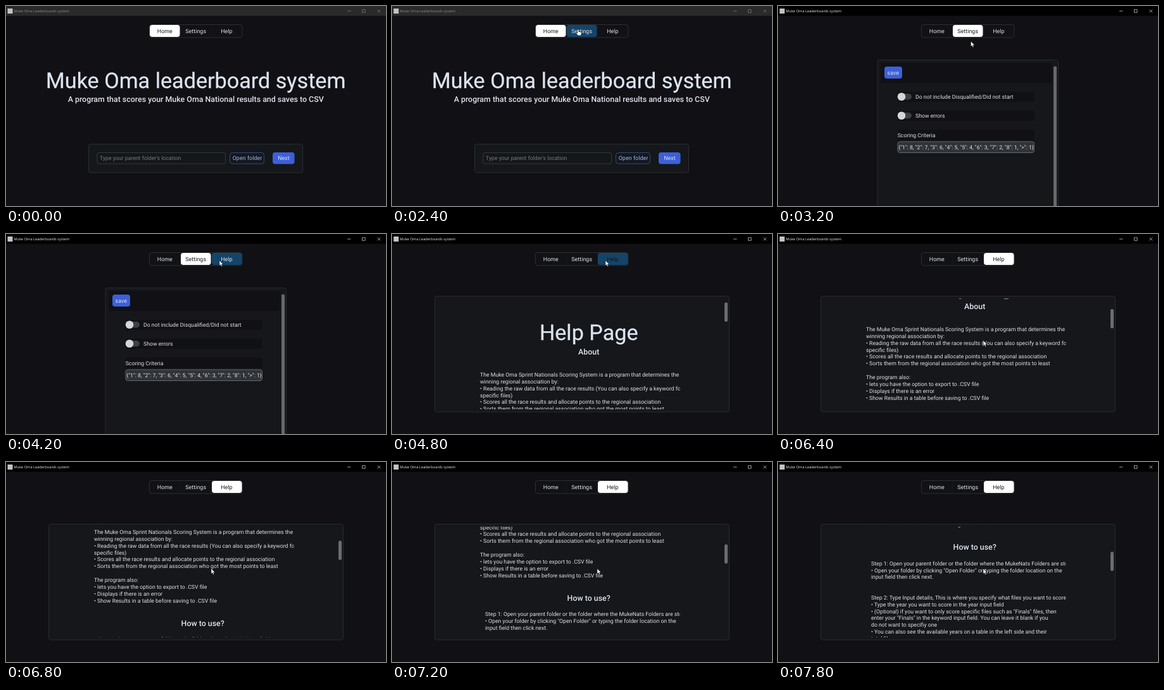
An HTML page for the animation above (8 s loop, 600 px wide and 317 px high).

```html
<!DOCTYPE html>
<html lang="en">
<head>
<meta charset="utf-8">
<title>Leaderboard system</title>
<style>
html, body { margin: 0; width: 100%; height: 100%; overflow: hidden; background: #111014; }
svg { display: block; width: 100vw; height: 100vh; }
text { font: 8.72px Roboto, sans-serif; fill: #dfe1e6; white-space: pre; text-rendering: geometricPrecision; }
.mid { text-anchor: middle; }
.label { font-size: 8.9px; letter-spacing: .06px; text-anchor: middle; }
.big { font-size: 34.15px; fill: #dce4f0; stroke: #dce4f0; stroke-width: .3; text-anchor: middle; }
.sub { font-size: 12.4px; font-weight: 500; fill: #dfe4ee; text-anchor: middle; }
.bar text { font: 5.7px "Open Sans", sans-serif; }
.panel { fill: #15171b; stroke: #262b31; }
</style>
</head>
<body>
<svg viewBox="0 0 600 317">
  <defs>
    <clipPath id="view"><rect x="130" y="102.5" width="324.5" height="175.5"/></clipPath>
  </defs>
  <rect width="600" height="317" fill="#111014"/>

  <g class="bar">
    <rect id="bar" width="600" height="15.5"/>
    <rect x="2.5" y="4" width="8" height="8" fill="#c4c4c4"/>
    <text id="caption" x="12.5" y="10.3">Muke Oma Leaderboards system</text>
    <path id="controls" d="M539 8h5.5M562.5 5.7h4.6v4.6h-4.6zM586.5 5.7l4.6 4.6M591.1 5.7l-4.6 4.6" fill="none" stroke-width=".7"/>
  </g>

  <rect x="226.5" y="29.5" width="146.5" height="20.5" rx="3.5" fill="#111215" stroke="#2b2f33"/>
  <path d="M275.5 30v20M324.5 30v20" stroke="#17191d"/>
  <g id="tabs"></g>

  <g id="home">
    <text class="big" x="299.7" y="130">Muke Oma leaderboard system</text>
    <text class="sub" x="299.7" y="152">A program that scores your Muke Oma National results and saves to CSV</text>
    <rect class="panel" x="130.5" y="219" width="338" height="45" rx="3" style="stroke:#283031"/>
    <rect x="144" y="232.5" width="202.5" height="17.5" rx="2.5" fill="#14171a" stroke="#34393d"/>
    <text x="148" y="244" style="fill:#777b80">Type your parent folder's location</text>
    <rect x="353.5" y="232.5" width="54" height="17.5" rx="4" fill="#14181f" stroke="#30497f"/>
    <text class="label" x="381" y="244" style="fill:#a6b6ee">Open folder</text>
    <rect x="421" y="232" width="34.5" height="18.5" rx="4" fill="#3c60da"/>
    <text class="label" x="438.5" y="244">Next</text>
  </g>

  <g id="settings">
    <rect class="panel" x="157" y="85.5" width="285.5" height="250" rx="3"/>
    <rect x="162" y="90" width="270.5" height="32" rx="3" fill="#111115"/>
    <rect x="435" y="95.5" width="5" height="240" rx="2" fill="#66686a"/>
    <rect x="168" y="96" width="28" height="19" rx="4" fill="#3c60da"/>
    <text class="label" x="181.8" y="108.5">save</text>
    <g id="toggle">
      <rect x="189" y="136" width="216" height="16" rx="2" fill="#111115"/>
      <rect x="189" y="139" width="22" height="9.5" rx="4.7" fill="#3d4047"/>
      <circle cx="195" cy="143.8" r="6.3" fill="#d6d6da"/>
    </g>
    <use href="#toggle" y="30"/>
    <text x="217" y="147">Do not include Disqualified/Did not start</text>
    <text x="217" y="177">Show errors</text>
    <rect x="189" y="196" width="216" height="17" rx="2" fill="#111115"/>
    <text x="188.7" y="208.3">Scoring Criteria</text>
    <rect x="189" y="215" width="215.5" height="17.5" rx="3.5" fill="#303337" stroke="#63676c"/>
    <text class="mid" x="297" y="226.8">{"1": 8, "2": 7, "3": 6, "4": 5, "5": 4, "6": 3, "7": 2, "8": 1, "&gt;": 1}</text>
  </g>

  <g id="help">
    <rect class="panel" x="67.5" y="98.5" width="465" height="183.5" rx="3"/>
    <g clip-path="url(#view)">
      <g id="page">
        <text class="big" x="310.7" y="168.3">Help Page</text>
        <text class="sub" x="310.7" y="190.5">About</text>
        <text class="sub" x="310.7" y="371.8">How to use?</text>
      </g>
    </g>
    <rect id="thumb" x="525" width="5" height="30.5" rx="2" fill="#6c6d6f"/>
  </g>

  <path id="arrow" d="M0 0v8.2l1.9-1.7 1.3 2.9 1.4-.6-1.3-2.9h2.6z" fill="#fff" stroke="#111" stroke-width=".5"/>
  <path id="hand" d="M-1 .4q.9-1 1.8 0v3.2l3.5 .8q.9 .3 .8 1.3l-.7 4h-4.8l-2.8-3.7q.5-1.1 2.2 .1z" fill="#fff" stroke="#111" stroke-width=".5"/>
</svg>
<script>
const $ = id => document.getElementById(id);

function add(parent, tag, attrs, text = "") {
  const el = document.createElementNS("http://www.w3.org/2000/svg", tag);
  for (const k in attrs) el.setAttribute(k, attrs[k]);
  el.textContent = text;
  return parent.appendChild(el);
}

function paragraph(x, y, text) {
  text.split("\n").forEach((line, i) => add($("page"), "text", { x, y: y + i * 10.85 }, line));
}

paragraph(139, 226, `The Muke Oma Sprint Nationals Scoring System is a program that determines the
winning regional association by:
• Reading the raw data from all the race results (You can also specify a keyword for
specific files)
• Scores all the race results and allocate points to the regional association
• Sorts them from the regional association who got the most points to least

The program also:
• lets you have the option to export to .CSV file
• Displays if there is an error
• Show Results in a table before saving to .CSV file`);

paragraph(147, 396, `Step 1: Open your parent folder or the folder where the MukeNats Folders are stored
• Open your folder by clicking "Open Folder" or typing the folder location on the
input field then click next.


Step 2: Type Input details, This is where you specify what files you want to score
• Type the year you want to score in the year input field
• (Optional) if you want to only score specific files such as "Finals" files, then
enter your "Finals" in the keyword input field. You can leave it blank if you
do not want to specifiy one
• You can also see the available years on a table in the left side and their
total files`);

const pages = ["home", "settings", "help"];
const tabs = ["Home", "Settings", "Help"].map((name, i) => ({
  box: add($("tabs"), "rect", { x: 227 + i * 49, y: 30, width: 47.5, height: 19, rx: 4 }),
  text: add($("tabs"), "text", { class: "label", x: 250.8 + i * 48.8, y: 42.6 }, name)
}));

// Linear interpolation through [time, value] keys
function track(keys, t) {
  if (t <= keys[0][0]) return keys[0][1];
  for (let i = 1; i < keys.length; i++) {
    const [a, from] = keys[i - 1], [b, to] = keys[i];
    if (t < b) return from + (to - from) * (t - a) / (b - a);
  }
  return keys[keys.length - 1][1];
}

const cursorX = [[2600, 294], [3200, 304.5], [3400, 306], [4200, 337], [5200, 337], [5800, 324]];
const cursorY = [[2600, 37], [3200, 56], [3400, 56], [4200, 42], [5200, 42], [5800, 169]];
const scrollY = [[5800, 0], [6400, 72], [7200, 152], [7800, 232.3]];

function draw(now) {
  const t = Math.floor(now % 8000 / 200) * 200;
  const active = t >= 2600;
  const page = t < 2800 ? 0 : t < 4400 ? 1 : 2;
  const x = track(cursorX, t), y = track(cursorY, t), scroll = track(scrollY, t);
  const hover = t >= 2400 && y < 50 ? Math.floor((x - 227) / 48.8) : -1;

  $("bar").setAttribute("fill", active ? "#000" : "#2b2a2b");
  $("caption").style.fill = active ? "#e8e8e8" : "#8a8a8a";
  $("controls").setAttribute("stroke", active ? "#e0e0e0" : "#858585");

  tabs.forEach(({ box, text }, i) => {
    box.setAttribute("fill", i === hover ? "#154469" : i === page ? "#fff" : "none");
    text.style.fill = i === page ? "#15161a" : "#e2e4ea";
  });
  pages.forEach((id, i) => $(id).style.display = i === page ? "" : "none");

  $("page").setAttribute("transform", `translate(0 ${-scroll})`);
  $("thumb").setAttribute("y", 108.5 + scroll * .145);

  const hand = t < 2800;
  $("hand").style.display = hand && t >= 2400 ? "" : "none";
  $("arrow").style.display = hand ? "none" : "";
  $(hand ? "hand" : "arrow").setAttribute("transform", `translate(${x} ${y})`);
}

const start = performance.now();
(function loop() {
  draw(performance.now() - start);
  requestAnimationFrame(loop);
})();
</script>
</body>
</html>
```
